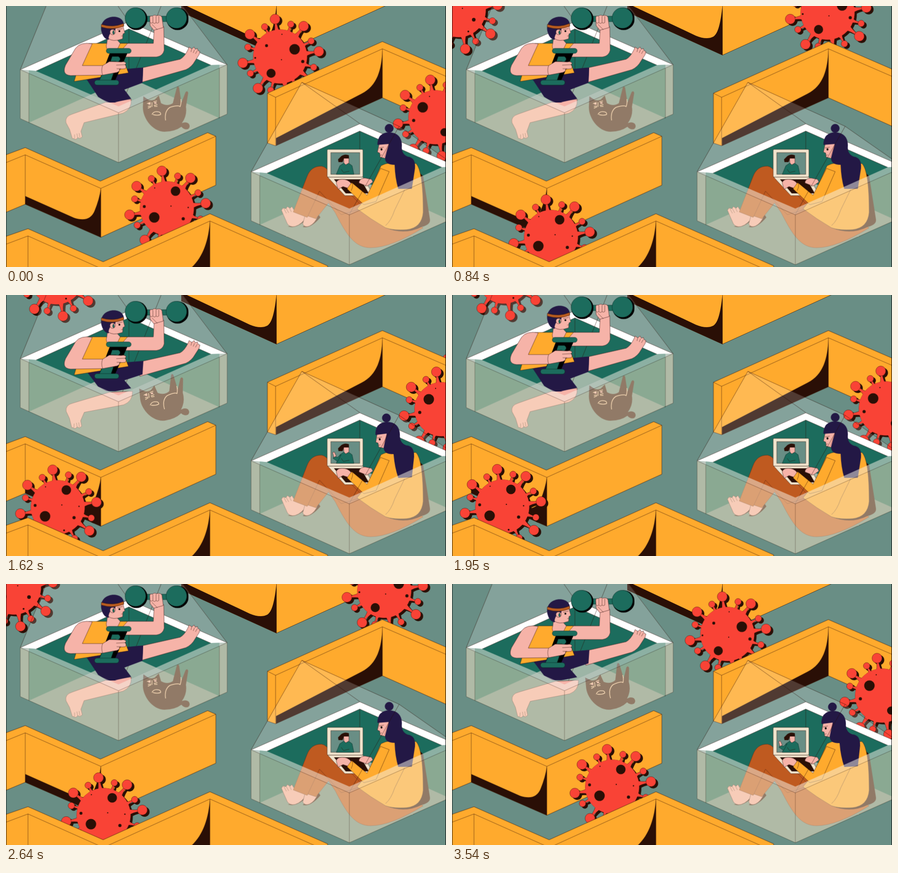
These frames come from a looping animation (972 px wide and 576 px high, 3.57 s). An HTML page:

```html
<!DOCTYPE html>
<html lang="en">
<head>
<meta charset="utf-8">
<title>Isolation</title>
<style>
html,body{margin:0;width:100%;height:100%;overflow:hidden;background:#698e85}
svg{display:block;width:972px;height:576px}
.ln{fill:none;stroke:#2a0f06;stroke-width:.8;stroke-opacity:.75}
.wall{fill:#ffaa2d;stroke:#2a0f06;stroke-width:.7}
.dark{fill:#2a0f06}
.skin{fill:#f6b3a8;stroke:#3a1a1a;stroke-width:.7}
.navy{fill:#231845}
.teal{fill:#1c6c5d;stroke:#0a2a24;stroke-width:.7}
.yel{fill:#ffaa2d;stroke:#2a0f06;stroke-width:.6}
.rust{fill:#bf5a20;stroke:#5a2410;stroke-width:.6}
.cream{fill:#f1e4cd;stroke:#2a0f06;stroke-width:.6}
.tint{fill:#fff;fill-opacity:.18}

/* viruses glide along the walls, easing at every corner */
.v{animation:3.57s infinite cubic-bezier(.3333,0,.6667,1)}
.va{animation-name:va}.vb{animation-name:vb}.vc{animation-name:vc}.vd{animation-name:vd}
@keyframes va{
0%{transform:translate(355px,446px)}
25.21%{transform:translate(216.5px,510px)}
50.42%{transform:translate(102px,463px)}
75.63%{transform:translate(216.5px,510px);animation-timing-function:cubic-bezier(.3333,0,.6667,.938)}
100%{transform:translate(354.6px,446.2px)}}
@keyframes vb{
0%{transform:translate(605px,111px)}
25.21%{transform:translate(832px,13px)}
50.42%{transform:translate(1083px,140px)}
75.63%{transform:translate(832px,13px);animation-timing-function:cubic-bezier(.3333,0,.6667,.938)}
100%{transform:translate(605.7px,110.7px)}}
@keyframes vc{
0%,50.42%{transform:translate(948px,245px)}
25.21%{transform:translate(1079px,309px)}
75.63%{transform:translate(1079px,309px);animation-timing-function:cubic-bezier(.3333,0,.6667,.938)}
100%{transform:translate(948.4px,245.2px)}}
@keyframes vd{
0%{transform:translate(-104px,66px)}
25.21%{transform:translate(16px,8px)}
50.42%{transform:translate(122px,-45px)}
75.63%{transform:translate(16px,8px);animation-timing-function:cubic-bezier(.3333,0,.6667,.938)}
100%{transform:translate(-103.6px,65.8px)}}

/* two held poses, swapped every 300 ms */
.p{animation:pose 3.57s infinite step-end}
@keyframes pose{
0%,16.807%,33.613%,50.42%,67.227%,84.034%{transform:none}
8.403%,25.21%,42.017%,58.824%,75.63%,92.437%{transform:var(--alt)}}
.wave{animation:wave 3.57s infinite step-end}
@keyframes wave{
0%,16.807%,33.613%,50.42%,67.227%,84.034%{opacity:0}
8.403%,25.21%,42.017%,58.824%,75.63%,92.437%{opacity:1}}
.lift{--alt:translate(0,10px)}
.squash{--alt:scaleY(.872);transform-origin:0 213px}
.knee{--alt:rotate(3deg);transform-origin:146px 265px}
.roll{--alt:translate(-4px,0) rotate(-8deg);transform-origin:350px 240px}
.nod{--alt:rotate(-2.7deg);transform-origin:870px 400px}
</style>
</head>
<body>
<svg viewBox="-.5 -.5 972 576" xmlns="http://www.w3.org/2000/svg">
<defs>
  <g id="big"><path d="M-7-54Q-2.3-64-2.3-78H2.3Q2.3-64 7-54Z"/><circle cy="-85" r="11"/></g>
  <g id="small"><path d="M-5-54Q-1.8-62-1.8-70H1.8Q1.8-62 5-54Z"/><circle cy="-76" r="7.2"/></g>
  <g id="germ"></g>
  <use id="shade" href="#germ" x="5" y="4" fill="#2a0f06"/>
  <g id="shell">
    <use href="#germ" fill="#f94336" stroke="#2a0f06" stroke-width=".5"/>
    <circle r="59.5" fill="#f94336"/>
  </g>
  <g id="boxBack">
    <path fill="#1c6c5d" d="M50 141 271 50 471 129V247L248 345 50 257Z"/>
    <path fill="#698e85" d="M50 257 271 157 471 247 248 345Z"/>
    <path fill="#9db5a6" d="M187 195 271 157 331 184 248 221Z"/>
    <path fill="#fff" d="M31 140 271 34 488 129 452 130 271 50 66 143Z"/>
    <path class="ln" d="M31 140 271 34 488 129M66 143 271 50 452 130M271 50V157"/>
  </g>
  <g id="boxFront">
    <path fill="#f8e6c8" fill-opacity=".5" d="M31 140 248 235 488 129V238L248 345 31 248Z"/>
    <path fill="#f4efe4" fill-opacity=".52" d="M31 140 66 143 248 221 452 130 488 129 248 235Z"/>
    <path class="ln" style="stroke-opacity:.5" d="M31 140 248 235 488 129V238L248 345 31 248ZM248 235V345M50 149V257M471 137V247"/>
  </g>
</defs>

<rect x="-1" y="-1" width="974" height="578" fill="#698e85"/>

<!-- top wall -->
<path class="wall" d="M387-1V13L597 108 838-1Z"/>
<path class="dark" d="M387-1V13L597 108V-1C593 35 588 60 577 67Q562 75 538 65L398-1Z"/>
<path class="ln" d="M597 0V108"/>

<g class="v vb"><use href="#shade"/><use href="#shell"/>
  <g class="dark"><circle cx="32" cy="-16" r="11.5"/><circle cx="-20" cy="37" r="10"/><circle cx="-30" cy="-24" r="3.2"/><circle cx="50" cy="11" r="3.5"/><circle cx="-55" cy="3" r="2"/><circle cx="3" cy="7" r="1.2"/><circle cx="4" cy="-49" r="1.2"/></g>
</g>

<!-- right wall -->
<path class="wall" d="M577 192 831 78 972 139V265L831 202 595 308 577 302Z"/>
<path class="dark" d="M831 97C829 140 820 175 785 193L596 291V308L831 202Z"/>
<path class="ln" d="M577 192 595 201 831 94 972 155M595 201V308M831 94V202"/>

<g class="v vc"><use href="#shade"/></g>
<path class="tint" d="M653 168 541 365 757 461 997 355 868 265Z"/>
<g class="v vc"><use href="#shell"/>
  <g class="dark"><circle cx="-28" cy="-22" r="11.5"/><circle cx="20" cy="33" r="9"/><circle cx="-48" cy="7" r="3.5"/><circle cx="-13" cy="-46" r="1.2"/></g>
</g>

<!-- left wall -->
<path class="wall" d="M-1 328 42 312 208 386 445 279 463 287V395L209 510 42 437-1 455Z"/>
<path class="dark" d="M42 419 150 467Q184 478 195 452Q206 425 209 402V510L42 437Z"/>
<path class="ln" d="M0 345 42 328 209 402 463 287M42 328V437M209 402V510"/>

<g class="v va"><use href="#shade"/><use href="#shell"/>
  <g class="dark"><circle cx="19" cy="-38" r="10.5"/><circle cx="-28" cy="20" r="11.5"/><circle cx="-50" cy="-4" r="3.2"/><circle cx="36" cy="23" r="3.5"/><circle cx="9" cy="-5" r="1.3"/><circle cx="47" cy="-2" r="1.5"/><circle cx="-27" cy="-45" r="1.2"/><circle cx="14" cy="51" r="2"/></g>
</g>

<!-- bottom wall -->
<path class="wall" d="M-1 508 48 491 214 564 450 458 710 573V577H-1Z"/>
<path class="dark" d="M450 474C447 515 436 552 409 577H450Z"/>
<path class="ln" d="M0 525 48 507 203 576M226 576 450 474 680 576M48 507V576M450 474V576"/>

<!-- box with the athlete -->
<g class="v vd"><use href="#shade"/></g>
<path class="tint" d="M88-1 31 140 248 235 488 129 390-1Z"/>
<g class="v vd"><use href="#shell"/>
  <g class="dark"><circle cx="33" cy="21" r="4"/><circle cx="-28" cy="20" r="11"/><circle cx="21" cy="47" r="2"/><circle cx="8" cy="-4" r="1.3"/></g>
</g>
<use href="#boxBack"/>
<path class="ln" d="M88 0 31 140M390 0 488 129M247 0 271 34M342 0 248 235"/>

<g class="p roll">
  <path class="dark" d="M303 199 315 207Q322 209 328 206L337 197 342 214Q356 222 368 214L377 179Q380 175 382 180L387 213 396 190Q400 185 402 191L397 222Q400 242 388 258Q397 254 403 259Q408 266 402 271Q394 274 387 266Q372 277 349 277C322 276 300 245 302 220Z"/>
  <path fill="none" stroke="#f3c9a0" stroke-width="1.5" d="M311 215 319 212M325 211 333 209M322 212V222M313 221 320 220M326 219 334 217M313 225 320 222M327 221 334 221M322 239Q326 231 336 233Q342 234 341 239Q334 242 324 239M352 252Q349 231 362 223Q382 217 384 222M384 222Q387 214 386 205"/>
  <path class="skin" style="stroke:none" d="M314 214h5v3h-5zM327 212h5v3h-5z"/>
</g>

<g class="p knee">
  <path class="skin" d="M276 205Q278 227 258 236L172 257 165 276 168 288 163 292 158 290 154 294 149 292 146 292 140 272 132 257Q129 243 146 238L225 210Z"/>
  <path class="ln" d="M151 283V291M156 281 158 290M161 280 163 290"/>
</g>

<g class="p lift">
  <path class="skin" d="M295 137 384 117Q394 112 402 95L404 90 410 94 415 90 418 95 422 93 424 98 428 100 426 107 417 121Q410 134 397 140L295 169Z"/>
  <path class="ln" d="M410 94 408 101M416 96 413 103M422 98 418 105"/>
</g>
<path class="navy p squash" d="M178 162 250 140 303 135 301 169 261 184 276 204 240 212 222 212 203 200Z"/>

<g class="p lift">
  <path class="skin" d="M236 82H325L327 45H348L349 97Q346 110 332 112H238Z"/>
  <path class="yel" d="M182 82H268L252 100 270 147 150 166 160 132Z"/>
  <path class="skin" d="M224 68 222 83Q219 90 225 98L243 100 252 82 243 72Z"/>

  <path class="navy" d="M210 54C204 16 262 14 260 43L238 55 226 74Q214 72 210 54Z"/>
  <path class="skin" d="M227 51 258 44 262 59 258 61 257 72 246 75Q228 78 222 66 224 55 227 51Z"/>
  <path class="navy" d="M225 48 242 47 240 57Q228 55 226 71L218 70Z"/>
  <path d="M210 40Q236 48 259 38L260 44Q236 54 210 46Z" fill="#b85c20" stroke="#2a0f06" stroke-width=".6"/>
  <circle class="skin" cx="235" cy="57" r="6"/>
  <path class="teal" d="M237 53Q233 59 237 62 241 61 237 53Z"/>
  <path class="ln" d="M245 52 257 49M254 66 258 65"/><circle cx="250" cy="55" r="2"/>

  <rect class="teal" x="300" y="22" width="65" height="12"/>
  <circle cx="287.5" cy="28" r="24.5"/><circle class="teal" cx="285.5" cy="26" r="22.8"/>
  <circle cx="378.5" cy="28" r="24.5"/><circle class="teal" cx="376" cy="26" r="22.8"/>
  <path class="skin" d="M317 26Q317 20 323 22 327 18 332 21 340 18 344 24L347 47 326 53 318 43Z"/>
  <path class="ln" d="M324 23V36Q321 39 318 36M331 22V36Q327 40 324 36M337 22V36Q333 39 331 36M322 40 334 52"/>

  <path d="M229 103H268L240 165H205Z"/>
  <path class="teal" d="M213 148H237L231 165H205ZM234 111H248Q256 117 247 123H230Z"/>
  <rect class="teal" x="221" y="93" width="55" height="11" rx="5.5"/>
  <rect class="teal" x="195" y="163" width="54" height="11" rx="5.5"/>
  <path class="skin" d="M190 83Q164 78 153 93L131 130Q122 151 142 153L213 152 245 146Q252 143 250 139L263 138Q267 133 262 129L265 126Q262 121 254 123L228 122 213 131 168 131Z"/>
  <path class="ln" d="M213 131Q209 141 213 152M243 130 262 129M244 138 254 138M228 122 243 121"/>
</g>
<use href="#boxFront"/>

<!-- box with the remote worker -->
<use href="#boxBack" x="510" y="225.5"/>
<path class="ln" d="M541 365 653 168 868 265 997 355M653 168 781 259"/>

<path class="dark" d="M622 486Q640 492 662 472L670 462 646 482ZM655 487Q672 492 694 466L690 460Z"/>
<path class="skin" d="M636 450 631 442 627 446 621 442 618 447 612 445 608 450 613 462 621 480Q626 488 638 486 654 481 663 464Z"/>
<path class="skin" d="M661 458 655 481Q660 489 670 485 682 479 688 464Z"/>
<path class="ln" d="M613 446 619 457M619 447 624 456M626 446 630 454"/>
<path class="rust" d="M688 408 657 460 684 469 712 434 727 456C752 505 770 533 805 533Q850 533 921 489L800 425 720 390Z"/>
<path class="rust" d="M664 377Q673 352 697 353Q708 355 716 370L790 445 740 460 692 408 665 466 634 454Z"/>
<path class="dark" d="M905 360 921 375 936 470Q938 482 918 487Q880 506 838 489L880 440Z"/>
<path class="yel" d="M828 352Q846 342 862 350L905 347Q921 362 921 455Q918 489 885 493Q855 495 838 489Q805 470 775 447L798 419Z"/>
<path class="ln" d="M880 405 858 450Q850 474 838 484"/>

<path class="cream" d="M710 377H788L812 418H748Z"/>
<path class="dark" d="M724 382H783L801 413H750Z"/>
<rect class="cream" x="709" y="316" width="79" height="61" rx="2"/>
<rect x="717" y="323" width="64" height="48" fill="#698e85" stroke="#2a0f06" stroke-width=".6"/>
<path class="teal" d="M729 371 737 352 746 346H756L764 352 768 371Z"/>
<path class="ln" d="M740 360 745 367 758 364"/>
<path class="skin" d="M745 334H757V346L750 350 746 346Z"/>
<path class="dark" d="M740 331Q748 325 757 329V336H746L743 344H734L733 338Z"/>
<g class="wave">
  <path class="teal" d="M740 352 732 367 722 360 725 354 731 358Z"/>
  <path class="skin" d="M721 347 725 346 729 355 724 358Z"/>
</g>

<path class="skin" d="M733 404 729 390Q731 382 741 382 754 381 762 391L756 402 744 398Z"/>
<path class="skin" d="M779 390Q780 380 792 379L807 382 810 388 797 397Z"/>
<path class="yel" d="M753 403 763 389 797 417 827 358 846 365 817 431 790 438Z"/>
<path class="ln" d="M763 389Q768 394 762 407"/>

<g class="p nod">
  <path class="skin" d="M824 303 820 322 825 324 826 333 838 336 848 330 848 300Z"/>
  <path class="ln" d="M823 313 834 311M826 329 830 328"/><ellipse cx="829" cy="316" rx="2" ry="2.4"/>
  <circle class="navy" cx="846" cy="269.5" r="9.7"/>
  <path class="navy" d="M820 306Q820 279 846 278Q874 280 874 307Q872 326 887 332Q905 334 903 358L896 403H866Q859 380 858 350Q836 350 837 334L845 304Z"/>
  <path class="ln" style="stroke:#a84a3a" d="M845 306 835 333"/>
</g>
<path class="ln" d="M868 265 757 461"/>
<use href="#boxFront" x="510" y="225.5"/>

<path d="M-.5-1H.5V577H-.5ZM970.5-1H972V577H970.5Z"/>
</svg>
<script>
// eight long and eight short spikes around the shell
let spikes = '';
for (let i = 0; i < 8; i++) {
  spikes += `<use href="#big" transform="rotate(${i * 45 - 8.6})"/>`
          + `<use href="#small" transform="rotate(${i * 45 + 17})"/>`;
}
document.getElementById('germ').innerHTML =
  `<circle r="59.5"/><g transform="translate(1.5 1.5)">${spikes}</g>`;
</script>
</body>
</html>
```
